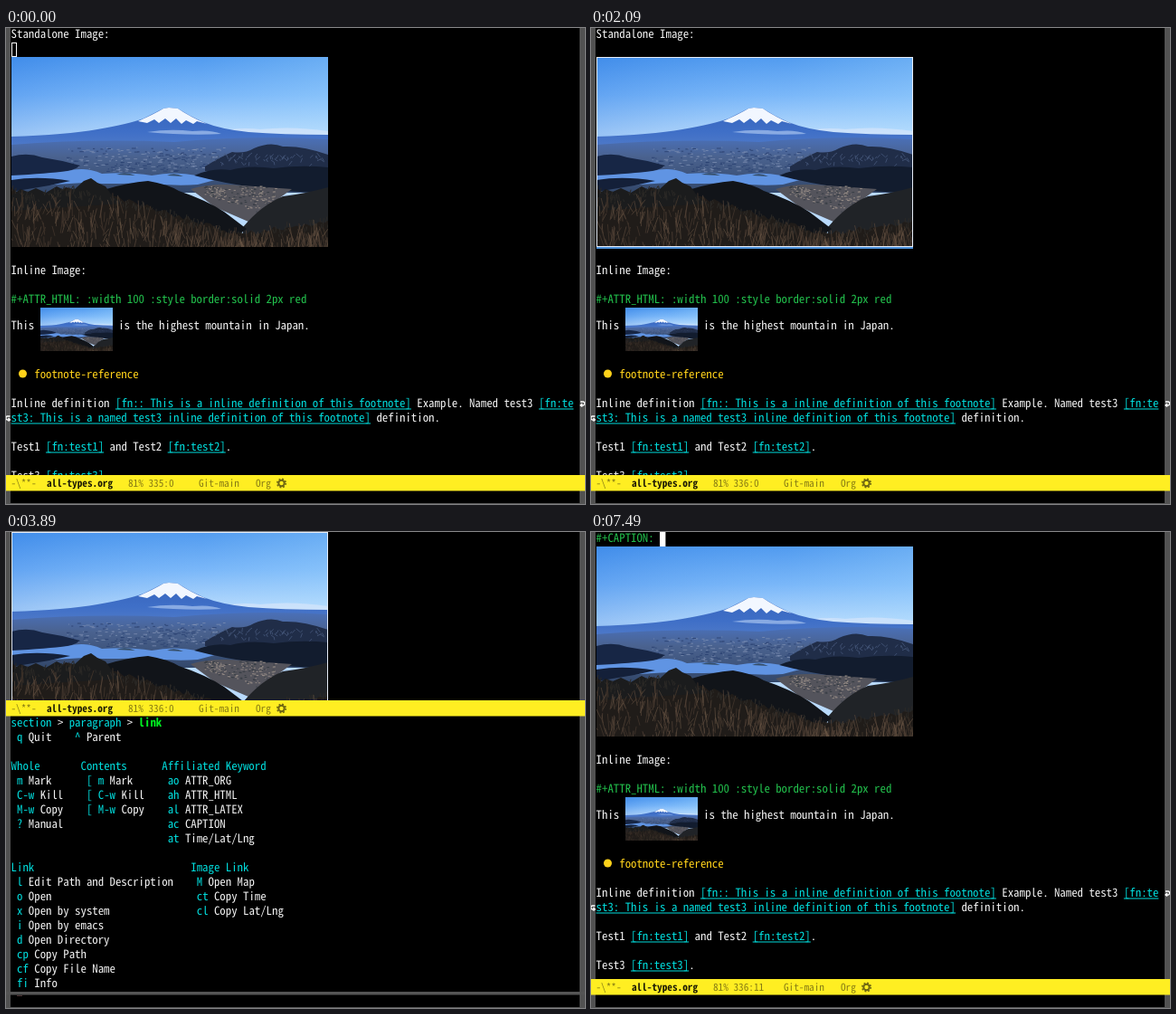
Animation of 640 by 526 pixels, one loop 8 s. Source, as an HTML page:

```html
<!DOCTYPE html>
<html lang="en">
<head>
<meta charset="utf-8">
<title>Org editor</title>
<style>
  html, body { margin: 0; width: 100%; height: 100%; overflow: hidden; background: #000; }
  svg { display: block; }
  text { white-space: pre; text-rendering: geometricPrecision; fill: #f2f2f2;
         font-family: "Noto Sans Mono CJK JP", "Noto Sans Mono", "DejaVu Sans Mono", monospace; }
  .cyan, .key { fill: #00dcdc; }
  .green { fill: #22c04c; }
  .gold { fill: #ffd21a; }
  .here { fill: #00f020; font-weight: bold; }
  .dim { fill: #877c14; }
  .file { fill: #1c1a04; font-weight: bold; }
</style>
</head>
<body>
<svg id="stage" width="640" height="526" xmlns="http://www.w3.org/2000/svg"></svg>
<script>
const LOOP = 8000;
const STARTS = [0, 1500, 2090, 2990, 4490, 7490];
const CELL = 6.41, LEFT = 5.6, ROW = 16;
const stage = document.getElementById('stage');

// Font size that gives the wanted advance in whichever mono font is present
const pen = document.createElement('canvas').getContext('2d');
pen.font = '100px "Noto Sans Mono CJK JP", "Noto Sans Mono", "DejaVu Sans Mono", monospace';
const emAdvance = pen.measureText('M').width / 100;
const sizeFor = advance => (advance / emAdvance).toFixed(3);
const BODY = sizeFor(CELL), SMALL = sizeFor(5.62);

let seed = 11;
const rnd = (a = 0, b = 1) => {
  seed = seed * 16807 % 2147483647;
  return a + (b - a) * seed / 2147483647;
};

const rect = (x, y, w, h, fill, extra = '') =>
  `<rect x="${x}" y="${y}" width="${w}" height="${h}" fill="${fill}" ${extra}/>`;
const shape = (d, fill, extra = '') => `<path d="${d}" fill="${fill}" ${extra}/>`;
const text = (x, y, s, cls = '', size = BODY) =>
  `<text x="${x}" y="${y}" class="${cls}" font-size="${size}">${s}</text>`;
const at = (col, y, s, cls) => text(LEFT + col * CELL, y, s, cls);
const link = (col, y, s) =>
  at(col, y, s, 'cyan') + rect(LEFT + col * CELL, y + 1.5, s.length * CELL, 1, '#00dcdc');
const fringes = (y, h) => rect(0, y, 5, h, '#525252') + rect(634, y, 6, h, '#525252');

const gradient = (id, stops) =>
  `<linearGradient id="${id}" x1="0" y1="0" x2="0" y2="1">` +
  stops.map(([o, c]) => `<stop offset="${o}" stop-color="${c}"/>`).join('') + '</linearGradient>';

// Height of the grassy foreground at x
const ground = x => x < 110 ? 147 + 5 * Math.sin(x / 14) + x * 0.06
  : x < 255 ? 154 + (x - 110) * 0.29 : 196 - (x - 255) * 0.16;

function strokes(count, color, width, place) {
  let d = '';
  for (let i = 0; i < count; i++) {
    const [x, y, dx, dy] = place();
    d += `M${x.toFixed(1)} ${y.toFixed(1)}l${dx.toFixed(1)} ${dy.toFixed(1)}`;
  }
  return `<path d="${d}" fill="none" stroke="${color}" stroke-width="${width}"/>`;
}

const blade = () => {
  const x = rnd(0, 350), top = ground(x) + 14;
  return [x, rnd(top, 222), rnd(-6, 6), -rnd(6, 20)];
};
const leaf = () => {
  const x = rnd(0, 350);
  return [x, ground(x) + rnd(0, 10), rnd(-2, 2), -rnd(2, 7)];
};
const house = () => [rnd(60, 240), rnd(100, 127), rnd(1, 5), 0];
const roof = () => {
  const x = rnd(212, 292);
  return [x, rnd(143, 150 + (x - 205) * 0.33), rnd(1, 3), 0];
};
const ridge = () => {
  const x = rnd(222, 345);
  return [x, rnd(106, 118), rnd(-5, 5), rnd(2, 5)];
};

function photo() {
  let edge = 'M0 210';
  for (let x = 0; x <= 350; x += 5) edge += `L${x} ${(ground(x) + rnd(-3, 3)).toFixed(1)}`;
  return rect(0, 0, 350, 210, 'url(#sky)') +
    rect(0, 0, 350, 90, 'url(#glow)') +
    shape('M225 83Q250 77 275 80Q310 76 350 82V88H225Z', '#d3e5fb', 'opacity=".75"') +
    shape('M0 88Q60 86 95 80Q130 74 146 68Q162 60 168 57L174 56L184 57Q198 66 212 72Q232 80 262 83Q300 86 350 86V115H0Z', 'url(#slope)') +
    shape('M140 71Q158 63 168 57L174 56L184 57Q197 66 216 74L205 71L201 74L193 70L188 74L182 68L176 73L170 68L163 73L158 69L150 73Z', '#f2f7ff') +
    shape('M150 83Q175 79 200 82Q220 80 232 85Q195 87 150 83Z', '#b9d2f7', 'opacity=".6"') +
    shape('M0 97Q90 90 180 94Q270 86 350 91V150H0Z', 'url(#plain)') +
    strokes(150, '#8192b5', 0.7, house) +
    strokes(110, '#2b4272', 0.9, house) +
    shape('M0 110Q18 105 34 111Q55 114 76 120Q68 127 48 128L0 133Z', '#172645') +
    shape('M0 131Q40 129 62 126Q82 121 100 129Q130 127 155 131Q180 126 205 131Q225 125 245 124L236 133L206 141Q178 143 150 139Q105 141 80 139L0 144Z', '#6094e3') +
    shape('M116 130Q126 126 137 131ZM172 131Q180 127 190 132Z', '#364e68') +
    shape('M214 121Q230 111 244 105Q258 107 268 101Q286 93 300 99Q322 98 350 108V126H214Z', '#202d48') +
    strokes(60, '#46577a', 0.8, ridge) +
    shape('M202 131Q222 122 242 125Q262 119 290 123Q320 119 350 122V150Q270 149 202 131Z', '#121c2e') +
    shape('M198 146Q220 139 255 142L310 146L285 164L262 182L225 166Z', '#54545c') +
    strokes(130, '#a1968d', 0.8, roof) +
    strokes(80, '#343a42', 0.9, roof) +
    shape('M0 136Q30 131 65 137L42 142L0 149Z', '#142039') +
    shape('M256 188Q276 164 300 154Q325 151 350 144V200H256Z', '#202327') +
    shape('M105 146Q128 139 151 137Q174 141 185 148Q215 158 235 171L260 190L240 205L120 185Z', '#111419') +
    shape(edge + 'L350 210Z', '#201c19') +
    shape('M0 153L10 146L18 149L27 145L38 150L50 143L60 148L70 146L80 137L88 134L95 139L104 143L111 153L124 162L0 170Z', '#1b1c1d') +
    strokes(170, '#2b2926', 1, leaf) +
    strokes(230, '#3b3028', 1, blade) +
    strokes(190, '#58473a', 0.7, blade) +
    strokes(70, '#79624f', 0.5, blade);
}

const defs = '<defs>' +
  gradient('sky', [[0, '#4692ed'], [0.2, '#74b2f8'], [0.4, '#b9dafc'], [1, '#b9dafc']]) +
  gradient('slope', [[0, '#3765bd'], [0.45, '#3f6fc7'], [1, '#5e84c9']]) +
  gradient('plain', [[0, '#4a70b8'], [0.35, '#4a628f'], [1, '#33486b']]) +
  '<linearGradient id="glow"><stop offset="0" stop-color="#2f7be0" stop-opacity=".25"/>' +
  '<stop offset=".6" stop-color="#a5dcff" stop-opacity=".12"/>' +
  '<stop offset="1" stop-color="#a9deff" stop-opacity=".35"/></linearGradient>' +
  '<clipPath id="crop"><rect width="350" height="210"/></clipPath>' +
  `<g id="photo" clip-path="url(#crop)">${photo()}</g></defs>`;

const wrapMark = (x, y, flip) =>
  `<path transform="translate(${x} ${y}) scale(${flip} 1)" d="M-2 -2H1Q2.5 -2 2.5 0T1 2H-1M0 0L-2 2L0 3.5" fill="none" stroke="#fff" stroke-width="1.3"/>`;

const page = '<g id="page">' +
  at(0, 11, 'Standalone Image:') +
  at(0, 27, '#+CAPTION: ', 'green caption') +
  rect(6.5, 16.5, 5, 15, 'none', 'stroke="#fff" class="hollow"') +
  rect(6, 16, 6, 16, '#fff', 'class="solid"') +
  rect(76, 16, 6.4, 16, '#fff', 'class="caption"') +
  '<use href="#photo" x="6" y="32"/>' +
  '<g class="picked">' +
  rect(6.5, 32.5, 349, 209, 'none', 'stroke="#e8eef8"') +
  rect(6, 242, 350, 2, '#4b8fd8') + '</g>' +
  at(0, 272, 'Inline Image:') +
  at(0, 304, '#+ATTR_HTML: :width 100 :style border:solid 2px red', 'green') +
  at(0, 333, 'This') +
  '<use href="#photo" transform="translate(38 309) scale(.2286)"/>' +
  text(124.2, 333, 'is the highest mountain in Japan.') +
  '<circle cx="18.5" cy="382" r="4.5" fill="#ffd21a"/>' +
  at(4, 387, 'footnote-reference', 'gold') +
  at(0, 419, 'Inline definition') +
  link(18, 419, '[fn:: This is a inline definition of this footnote]') +
  at(70, 419, 'Example. Named test3') + link(91, 419, '[fn:te') +
  link(0, 435, 'st3: This is a named test3 inline definition of this footnote]') +
  at(63, 435, 'definition.') +
  at(0, 467, 'Test1') + link(6, 467, '[fn:test1]') +
  at(17, 467, 'and Test2') + link(27, 467, '[fn:test2]') + at(37, 467, '.') +
  at(0, 499, 'Test3') + link(6, 499, '[fn:test3]') + at(16, 499, '.') +
  wrapMark(637, 415, 1) + wrapMark(2.5, 431, -1) +
  '</g>';

// Menu entries: row, column, key, label
const COMMANDS = [
  [1, 1, 'q', 'Quit'], [1, 11, '^', 'Parent'],
  [4, 1, 'm', 'Mark'], [5, 1, 'C-w', 'Kill'], [6, 1, 'M-w', 'Copy'], [7, 1, '?', 'Manual'],
  [4, 13, '[ m', 'Mark'], [5, 13, '[ C-w', 'Kill'], [6, 13, '[ M-w', 'Copy'],
  [11, 1, 'l', 'Edit Path and Description'], [12, 1, 'o', 'Open'],
  [13, 1, 'x', 'Open by system'], [14, 1, 'i', 'Open by emacs'],
  [15, 1, 'd', 'Open Directory'], [16, 1, 'cp', 'Copy Path'],
  [17, 1, 'cf', 'Copy File Name'], [18, 1, 'fi', 'Info'],
  [11, 32, 'M', 'Open Map'], [12, 32, 'ct', 'Copy Time'], [13, 32, 'cl', 'Copy Lat/Lng']
];
const KEYWORDS = [['o', 'ATTR_ORG'], ['h', 'ATTR_HTML'], ['l', 'ATTR_LATEX'], ['c', 'CAPTION'], ['t', 'Time/Lat/Lng']];
const TITLES = [[3, 0, 'Whole'], [3, 12, 'Contents'], [3, 26, 'Affiliated Keyword'], [10, 0, 'Link'], [10, 31, 'Image Link']];
const line = row => 215 + row * ROW;

const menu = '<g id="menu">' + rect(0, 186, 640, 326, '#000') + fringes(186, 326) +
  at(0, line(0), 'section', 'cyan') + at(8, line(0), '&gt;') +
  at(10, line(0), 'paragraph', 'cyan') + at(20, line(0), '&gt;') + at(22, line(0), 'link', 'here') +
  TITLES.map(([r, c, s]) => at(c, line(r), s, 'cyan')).join('') +
  COMMANDS.map(([r, c, k, s]) =>
    at(c, line(r), k, 'key cmd-key') + at(c + k.length + 1, line(r), s, 'cmd')).join('') +
  KEYWORDS.map(([k, s], i) => at(27, line(4 + i), 'a', 'key typed') +
    at(28, line(4 + i), k, 'key') + at(30, line(4 + i), s)).join('') +
  rect(0, 508, 640, 3.5, '#555') + rect(12, 512, 6, 1, '#4a3434') + '</g>';

const small = (x, s, cls) => text(x, 507, s, cls, SMALL);
const modeline = '<g id="modeline">' + rect(0, 494, 640, 17.5, '#ffee22') +
  small(5.5, '-\\**-', 'dim') + small(45, 'all-types.org', 'file') +
  small(135, '81% 335:0', 'dim pos-a') + small(135, '81% 336:0', 'dim pos-b') +
  small(135, '81% 336:11', 'dim pos-c') +
  small(213, 'Git-main', 'dim') + small(276, 'Org', 'dim') +
  '<g fill="none" stroke="#6f6612"><circle cx="304.5" cy="503" r="3.2" stroke-width="2"/>' +
  '<circle cx="304.5" cy="503" r="4.7" stroke-width="1.7" stroke-dasharray="1.85 1.85"/></g></g>';

stage.innerHTML = defs + rect(0, 0, 640, 526, '#000') + fringes(0, 526) + page +
  rect(5, 511.5, 629, 15, '#000') + fringes(490, 36) + menu + modeline +
  rect(0, 525, 640, 1, '#555');

// Holds one value per step, changing hard at each start time
function steps(selector, prop, values) {
  const frames = STARTS.map((t, i) => ({ offset: t / LOOP, [prop]: values[i], easing: 'steps(1, end)' }));
  frames.push({ offset: 1, [prop]: values[values.length - 1] });
  for (const el of stage.querySelectorAll(selector))
    el.animate(frames, { duration: LOOP, iterations: Infinity });
}
const show = (selector, mask) => steps(selector, 'opacity', [...mask].map(Number));
const shift = (selector, ys) => steps(selector, 'transform', ys.map(y => `translateY(${y}px)`));

shift('#page', [0, 0, 0, -32, -32, -16]);
shift('#modeline', [0, 0, 0, -308, -308, 0]);
show('#menu', '000110');
show('.hollow', '100000');
show('.solid', '010000');
show('.picked', '001110');
show('.caption', '000001');
show('.pos-a', '110000');
show('.pos-b', '001110');
show('.pos-c', '000001');

const pressed = (on, off) => STARTS.map((_, i) => i === 4 ? off : on);
steps('.cmd-key', 'fill', pressed('#00dcdc', '#a2a2a2'));
steps('.cmd', 'fill', pressed('#f2f2f2', '#a2a2a2'));
steps('.typed', 'fill', pressed('#00dcdc', '#dcdcdc'));
</script>
</body>
</html>
```
